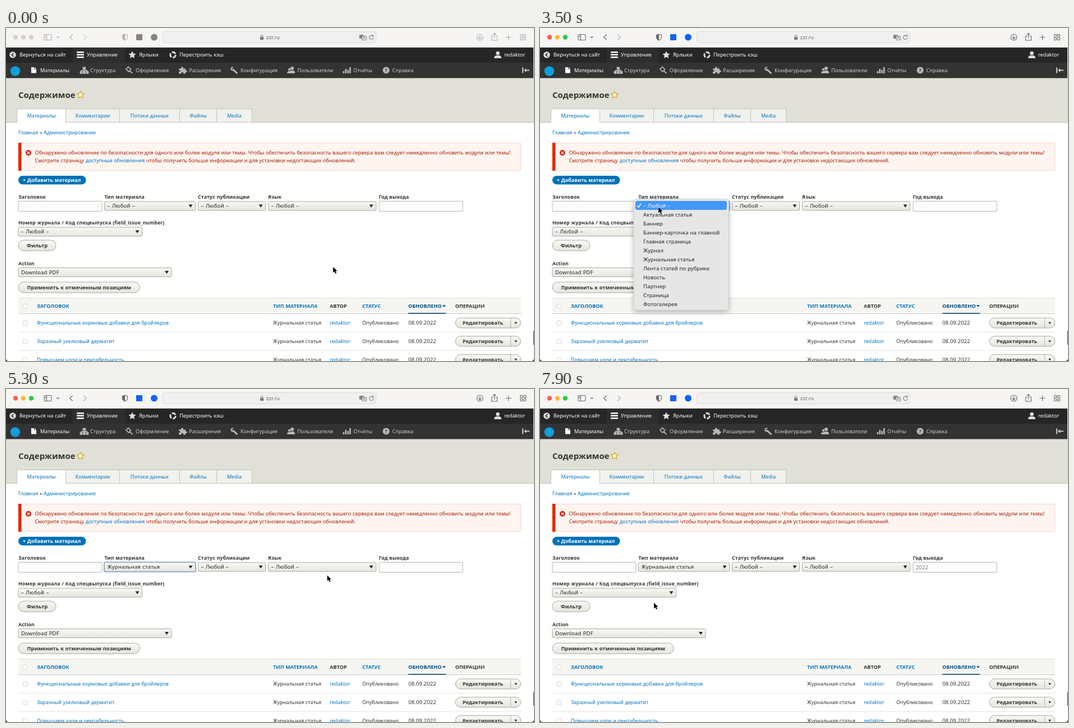
Write an HTML page that moves like this. It is 941 px wide and 595 px high and loops after 8 s.

```html
<!DOCTYPE html>
<html lang="ru">
<head>
<meta charset="utf-8">
<style>
html, body { margin: 0; width: 100%; height: 100%; overflow: hidden; background: #222; }
svg { display: block; width: 100%; height: 100%; }
text { font-family: "Noto Sans", "Open Sans", sans-serif; font-size: 9px; fill: #333; white-space: pre; word-spacing: .3px; }
.link { fill: #0074bd; }
.err { fill: #a51b00; font-size: 9.15px; }
.bold, .label, .btn, .th { font-weight: 700; }
.label { font-size: 8.8px; letter-spacing: .1px; }
.btn { font-size: 9.35px; }
.th { font-size: 9.1px; }
.field { font-size: 9.5px; fill: #222; letter-spacing: .15px; word-spacing: .7px; }
.item { font-size: 9.6px; }
.bar { font-size: 9.2px; fill: #fff; font-weight: 500; }
.tray { font-size: 9.2px; fill: #cfcfcf; }
.title { font-size: 15px; font-weight: 600; }
.url { font-family: Inter, sans-serif; font-size: 9px; fill: #666; }
.ico { fill: none; stroke: currentColor; stroke-width: 1.1; stroke-linecap: round; stroke-linejoin: round; }
.solid { fill: currentColor; }
</style>
</head>
<body>
<svg id="stage" viewBox="0 0 941 595" xmlns="http://www.w3.org/2000/svg"></svg>
<script>
const LOOP = 8000;
const ITEMS = ['– Любой –', 'Актуальная статья', 'Баннер', 'Баннер-карточка на главной', 'Главная страница',
  'Журнал', 'Журнальная статья', 'Лента статей по рубрике', 'Новость', 'Партнер', 'Страница', 'Фотогалерея'];
const USER = 'redaktor';

const rect = (x, y, w, h, fill, more = '') => `<rect x="${x}" y="${y}" width="${w}" height="${h}" fill="${fill}" ${more}/>`;
const text = (x, y, s, cls = '', more = '') => `<text x="${x}" y="${y}" class="${cls}" ${more}>${s}</text>`;
const path = (d, more = 'class="ico"') => `<path d="${d}" ${more}/>`;
const circle = (x, y, r, more) => `<circle cx="${x}" cy="${y}" r="${r}" ${more}/>`;
const group = (s, more = '') => `<g ${more}>${s}</g>`;
const line = (x, y, w, color) => rect(x, y, w, 1, color);
const arrow = (x, y, r = 3.5) => path(`M${x - r} ${y - r * .65}h${2 * r}l${-r} ${r * 1.5}z`, 'fill="#222"');
const input = (x, id = '') => rect(x + .5, 309.5, 149, 18, '#fcfcfa', `stroke="#b5b5b2" rx="1" ${id}`);
const select = (x, y, w, label, id = '') => rect(x + .5, y + .5, w - 1, 16, 'url(#grad)', 'stroke="#a8a8a2" rx="1.5"') +
  text(x + 5.5, y + 11.5, label, 'field', id) + arrow(x + w - 9, y + 8.2);
const pill = (x, y, w, h) => rect(x + .5, y + .5, w - 1, h - 1, 'url(#grad)', `stroke="#a6a6a0" rx="${h / 2}"`);
const button = (x, y, w, label) => pill(x, y, w, 20) + text(x + w / 2, y + 13.3, label, 'btn', 'text-anchor="middle"');
const star = (x, y, r, more) => {
  let d = '';
  for (let i = 0; i < 10; i++) {
    const a = i * Math.PI / 5, k = i % 2 ? r * .48 : r;
    d += `${i ? 'L' : 'M'}${(x + k * Math.sin(a)).toFixed(2)} ${(y - k * Math.cos(a)).toFixed(2)}`;
  }
  return path(d + 'z', more);
};

function chrome() {
  const dots = [17, 31, 45].map(x => circle(x, 16.5, 4.2, 'class="dot"')).join('');
  const icons = rect(68, 11.5, 13, 10, 'none', 'class="ico" rx="1.5"') + path('M72.5 11.5v10M69.5 14h1.500M69.5 16h1.5') +
    path('M90.5 15.5l2 2 2-2M118.500 12l-5 4.5 5 4.5') +
    path('M138.5 12l5 4.5-5 4.5', 'class="ico" opacity=".5"') +
    path('M212 11l4.5 1.5v4q0 3.5-4.5 5.5-4.5-2-4.5-5.5v-4z') + path('M212 11v11q-4.5-2-4.5-5.5v-4z', 'class="solid"') +
    circle(844.5, 16.5, 5.5, 'class="ico"') + path('M844.5 13.5v5.5M842 17l2.500 2.5 2.5-2.5') +
    path('M868 14.5h-2.5v7.5h10v-7.5h-2.5M870.5 18v-8M868 12l2.5-2.5 2.5 2.5M891 16.5h9M895.500 12v9') +
    [916.5, 922.5].map(x => [11.5, 17.5].map(y => rect(x, y, 4, 4, 'none', 'class="ico" rx=".8"')).join('')).join('');
  const url = rect(279.5, 6.5, 380, 20, '#f1f0ef', 'rx="5" stroke="#dddbd9"') +
    rect(453, 16, 6, 5, '#777', 'rx=".8"') + path('M454.2 16v-1.5a1.8 1.8 0 0 1 3.6 0v1.5') +
    text(463.5, 20.3, 'zzr.ru', 'url') +
    rect(629.5, 12, 8, 7, '#888', 'rx="1.5"') + rect(634.5, 14.5, 8, 7, '#f1f0ef', 'rx="1.5" stroke="#888"') +
    path('M636.5 19.5l2-4 2 4M632 14l3 3M635 14l-3 3') +
    path('M654.2 14.5a3.7 3.7 0 1 0 .8 2.5M652 14.5h2.5v-2.5');
  return rect(0, 0, 941, 35, '#f6f5f4') + group(dots + icons, 'id="chrome"') +
    rect(232, 11, 11, 11, '#888', 'class="ext" rx="1"') + circle(264, 16.5, 6, 'class="ext"') +
    group(url, 'color="#858381"') + line(0, 34, 941, '#d5d3d1');
}

function toolbar() {
  const grey = 'fill="#b9b9b9"', white = 'fill="#fff"';
  let s = rect(0, 35, 940, 27, '#262626') + rect(119, 35, 93, 27, '#2e2e2e') + rect(0, 62, 940, 27.5, '#333');
  s += circle(12, 48, 5.8, 'fill="#ddd"') + path('M13.5 45l-3.2 3 3.2 3', 'fill="none" stroke="#222" stroke-width="1.7"') +
    [42, 46.5, 51].map(y => rect(126, y, 13, 2.6, '#fff', 'rx=".6"')).join('') + star(225, 48.3, 7, 'fill="#ddd"') +
    circle(297.5, 48, 4.7, 'fill="none" stroke="#ddd" stroke-width="3" stroke-dasharray="7.3 2.54"') +
    circle(876.5, 45, 3.3, 'fill="#ddd"') + path('M870 54q0-4.5 4-5h5q4 .5 4 5z', 'fill="#ddd"');
  [[24, 'Вернуться на сайт'], [144, 'Управление'], [237, 'Ярлыки'], [309, 'Перестроить кэш'], [888, USER]]
    .forEach(([x, label]) => s += text(x, 51.3, label, 'bar'));
  s += circle(16.5, 77, 8.7, 'fill="#0c9fdc"') +
    path('M45 70h5v3.5h4v7h-9zM51 70l3 2.8h-3z', white) +
    path('M137 70h5v4h-5zM132 77.5h4v4h-4zM137.5 77.5h4v4h-4zM143 77.5h4v4h-4zM134 77v-1.5h11v1.5M139.5 74v3.5', 'fill="#b9b9b9" stroke="#b9b9b9" stroke-width=".8"') +
    path('M214 73.5l4-4 4.5 4.5-4 4zM220.5 76.5l5 4.5', 'fill="none" stroke="#b9b9b9" stroke-width="1.7"') +
    path('M308 72.5h4v-1a2 2 0 0 1 4 0v1h4v3h1a1.8 1.8 0 0 1 0 3.6h-1v2.4h-4v-1a1.7 1.7 0 0 0-3.4 0v1h-4.6v-3.5h1a1.5 1.5 0 0 0 0-3h-1z', grey) +
    path('M405 74.5l6.5 6', 'stroke="#b9b9b9" stroke-width="3" stroke-linecap="round"') +
    circle(404, 73, 2.6, 'fill="none" stroke="#b9b9b9" stroke-width="2" stroke-dasharray="12 4.3" stroke-dashoffset="-1"') +
    circle(510, 72, 3, grey) + path('M505 81q0-4.5 3-5h4q3 .5 3 5z', grey) + circle(505, 74, 2.2, grey) + path('M501 81q0-3.5 2.5-4h3v4z', grey) +
    [4, 8, 6, 11].map((h, i) => rect(600.5 + i * 3.8, 81 - h, 2.6, h, '#b9b9b9')).join('') +
    circle(677.5, 75.5, 6, grey) + text(677.5, 78.8, '?', 'bold', 'style="fill:#333" text-anchor="middle"') +
    rect(920, 70.5, 2, 10, '#ccc') + path('M923 75.5l4-3.5v2.5h6v2h-6v2.5z', 'fill="#ccc"');
  [[61, 'Материалы'], [150, 'Структура'], [231, 'Оформление'], [326, 'Расширения'], [418, 'Конфигурация'],
    [519, 'Пользователи'], [619, 'Отчёты'], [688.5, 'Справка']]
    .forEach(([x, label], i) => s += text(x, 78.5, label, i ? 'tray' : 'bar'));
  return s;
}

function header() {
  const edges = [19, 106, 202, 309, 375, 438];
  let s = rect(0, 89, 941, 79, '#e0e0d8') + text(22, 125, 'Содержимое', 'title') +
    star(132.8, 119.5, 6.8, 'fill="#fdf6c8" stroke="#c9a32c" stroke-width="1.1" stroke-linejoin="round"') + line(0, 168, 941, '#bcbcb5');
  ['Материалы', 'Комментарии', 'Потоки данных', 'Файлы', 'Media'].forEach((label, i) => {
    const x = edges[i], w = edges[i + 1] - x;
    s += rect(x + .5, 144.5, w, 24, i ? '#f1f1ed' : '#fff', 'stroke="#c3c3bc"') +
      text(x + w / 2 + .5, 160.2, label, 'link', 'text-anchor="middle"');
  });
  return s + rect(20, 168, 86, 1, '#fff');
}

function page() {
  let s = text(22, 190, '<tspan class="link">Главная</tspan> » <tspan class="link">Администрирование</tspan>');
  s += rect(22.5, 205.5, 895, 49, '#fef5f1', 'stroke="#f9d3c9" rx="1.5"') + rect(22, 205, 5.5, 50, '#e32700') +
    circle(40, 223, 5, 'fill="#d9230f"') + path('M38 221l4 4M42 221l-4 4', 'stroke="#fff" stroke-width="1.5"') +
    text(51.5, 226.3, 'Обнаружено обновление по безопасности для одного или более модуля или темы. Чтобы обеспечить безопасность вашего сервера вам следует немедленно обновить модули или темы!', 'err') +
    text(51.5, 240.3, 'Смотрите страницу <tspan class="link">доступные обновления</tspan> чтобы получить больше информации и для установки недостающих обновлений.', 'err');
  s += rect(22, 264, 120.5, 15.5, '#0071b8', 'rx="7.75"') + text(30, 275, '+ Добавить материал', 'bold', 'style="fill:#fff"');
  [[22, 305, 'Заголовок'], [175.5, 305, 'Тип материала'], [342, 305, 'Статус публикации'], [467, 305, 'Язык'], [664.5, 305, 'Год выхода'],
    [22, 351.3, 'Номер журнала / Код спецвыпуска (field_issue_number)'], [22, 424, 'Action']]
    .forEach(([x, y, label]) => s += text(x, y, label, 'label'));
  const any = ITEMS[0];
  s += input(21.5) + rect(174, 308.5, 165, 19, '#7fb0ef', 'id="ring" rx="3"') + select(175, 309.5, 163, any, 'id="kind"') +
    select(342, 309.5, 121, any) + select(467, 309.5, 193, any) +
    rect(663.5, 308.5, 151.5, 20.5, '#a9dcfb', 'id="glow" rx="3"') + input(664.5, 'id="year"') + text(669.5, 322, '', 'field', 'id="typed"') +
    rect(669, 313, 1, 11, '#333', 'id="caret"') +
    select(21.5, 355.5, 221.5, any) + button(21.5, 378.5, 68, 'Фильтр') +
    select(21.5, 428, 274, 'Download PDF') + button(21.5, 453.5, 217.5, 'Применить к отмеченным позициям');
  return s + table();
}

function table() {
  const box = y => rect(30, y - 4, 8, 8, '#fff', 'stroke="#d2d2d0" rx="1.5"');
  let s = rect(22, 482, 896, 29, '#f5f5f2') + line(22, 482, 896, '#dededa') + line(22, 510, 896, '#c9c9c4') + box(497);
  [[55, 'ЗАГОЛОВОК', 'link'], [476, 'ТИП МАТЕРИАЛА', 'link'], [577, 'АВТОР', ''], [635, 'СТАТУС', 'link'], [717, 'ОБНОВЛЕНО', 'sort'], [800.5, 'ОПЕРАЦИИ', '']]
    .forEach(([x, label, cls]) => s += text(x, 500.2, label, 'th ' + cls, cls === 'sort' ? 'style="fill:#004f80"' : ''));
  s += path('M778 495h5.5l-2.75 3.8z', 'fill="#004f80"') + rect(717, 509, 67, 1.5, '#004875');
  ['Функциональные кормовые добавки для бройлеров', 'Заразный узелковый дерматит', 'Повышаем удои и рентабельность'].forEach((title, i) => {
    const y = 527 + i * 32.7;
    s += box(y + .5) + text(55, y + 3.3, title, 'link') + text(476, y + 3.3, 'Журнальная статья') + text(577, y + 3.3, USER, 'link') +
      text(635, y + 3.3, 'Опубликовано') + text(717, y + 3.3, '08.09.2022', '', 'style="font-size:9.7px"') +
      pill(800.5, y - 9.5, 117.5, 19) + rect(899, y - 9, 1, 18, '#b5b5ae') +
      text(850, y + 3.3, 'Редактировать', 'bold', 'text-anchor="middle"') + arrow(908.5, y, 2.4) + line(22, Math.round(y + 16), 896, '#e6e4df');
  });
  return s;
}

const menu = () => rect(167, 306, 169.5, 198, '#e7e6e6', 'rx="5" stroke="#c2c2c2" stroke-width=".7" filter="url(#shadow)"') +
  rect(170, 309, 163, 16, '#4098fb', 'id="mark" rx="3.5"') +
  path('M173.5 317.5l2.2 3 4-6.5', 'id="tick" fill="none" stroke-width="1.5" stroke-linecap="round"') +
  ITEMS.map((label, i) => text(184, 320.8 + i * 16, label, 'item')).join('');

const pointer = path('M0 0v10.2l2.4-2.2 1.7 3.8 1.9-.8-1.7-3.7h3.2z', 'id="pointer" fill="#000" stroke="#fff" stroke-width=".9" paint-order="stroke"');

document.getElementById('stage').innerHTML =
  `<defs><linearGradient id="grad" x2="0" y2="1"><stop stop-color="#f8f8f5"/><stop offset="1" stop-color="#e6e6de"/></linearGradient>
  <filter id="shadow" x="-20%" y="-20%" width="140%" height="140%"><feDropShadow dx="0" dy="3" stdDeviation="4" flood-opacity=".28"/></filter></defs>` +
  rect(0, 35, 941, 560, '#fff') + chrome() + header() + toolbar() + page() +
  path('M0 590v5h5q-5 0-5-5zM941 590v5h-5q5 0 5-5z', 'fill="#222"') + rect(940, 541, 1, 25, '#333') +
  group(menu(), 'id="menu"') + pointer;

const $ = id => document.getElementById(id);
const all = q => [...document.querySelectorAll(q)];
const [dots, exts, items] = [all('.dot'), all('.ext'), all('.item')];
const show = (el, on) => el.setAttribute('visibility', on ? 'visible' : 'hidden');

// Pointer stops: time, x, y
const STOPS = [[0, 583, 427], [1400, 583, 427], [2300, 374, 341], [2750, 211, 319], [3450, 211, 319], [4200, 223, 413],
  [4600, 223, 413], [5300, 572, 333], [5600, 712, 319], [5900, 676, 420], [6600, 676, 420], [6990, 680, 338],
  [7150, 680, 338], [7900, 203, 382], [8000, 203, 382]];

function slope(i, k) {
  const a = STOPS[i - 1], b = STOPS[i], c = STOPS[i + 1];
  if (!a || !c) return 0;
  const u = b[k] - a[k], v = c[k] - b[k];
  return u * v <= 0 ? 0 : (u + v) / (c[0] - a[0]);
}

function position(t) {
  const i = Math.max(0, STOPS.findIndex(s => s[0] > t) - 1);
  const a = STOPS[i], b = STOPS[i + 1], d = b[0] - a[0], p = (t - a[0]) / d;
  const h = p * p * (3 - 2 * p);
  return [1, 2].map(k => a[k] + (b[k] - a[k]) * h +
    d * p * (1 - p) * ((1 - p) * slope(i, k) - p * slope(i + 1, k)));
}

function render(t) {
  const [x, y] = position(t);
  $('pointer').setAttribute('transform', `translate(${x.toFixed(2)} ${y.toFixed(2)})`);
  show($('pointer'), t < 6500 || t >= 7000);

  const active = t >= 2800;
  $('chrome').setAttribute('color', active ? '#6b6968' : '#b4b2b0');
  dots.forEach((el, i) => el.setAttribute('fill', active ? ['#fe5f57', '#febc2e', '#28c840'][i] : '#d3d1cf'));
  exts.forEach(el => el.setAttribute('fill', active ? '#1463f3' : '#868482'));

  show($('menu'), t >= 2900 && t < 4800);
  $('menu').setAttribute('opacity', t < 4600 ? 1 : Math.max(0, 1 - (t - 4600) / 200));
  const lit = t >= 4400 && t < 4500 ? -1 : Math.min(11, Math.max(0, Math.floor((y - 309) / 16)));
  $('mark').setAttribute('y', 309 + lit * 16);
  $('mark').setAttribute('opacity', lit < 0 ? 0 : 1);
  $('tick').setAttribute('stroke', lit ? '#222' : '#fff');
  items.forEach((el, i) => el.style.fill = i === lit ? '#fff' : '#222');

  show($('ring'), t >= 2900 && t < 5600);
  $('kind').textContent = ITEMS[t < 4600 ? 0 : 6];

  const focus = t >= 5600 && t < 7500;
  show($('glow'), focus);
  $('year').setAttribute('stroke', focus ? '#40b6ff' : '#b5b5b2');
  const count = Math.max(0, Math.min(4, Math.floor((t - 6400) / 100)));
  $('typed').textContent = '2022'.slice(0, count);
  $('typed').style.fill = focus ? '#333' : '#777';
  const width = count ? $('typed').getComputedTextLength() : 0;
  $('caret').setAttribute('x', 669.5 + width);
  show($('caret'), focus && (t < 5800 || t >= 6300));
}

function tick() {
  render(performance.now() % LOOP);
  requestAnimationFrame(tick);
}
tick();
</script>
</body>
</html>
```
